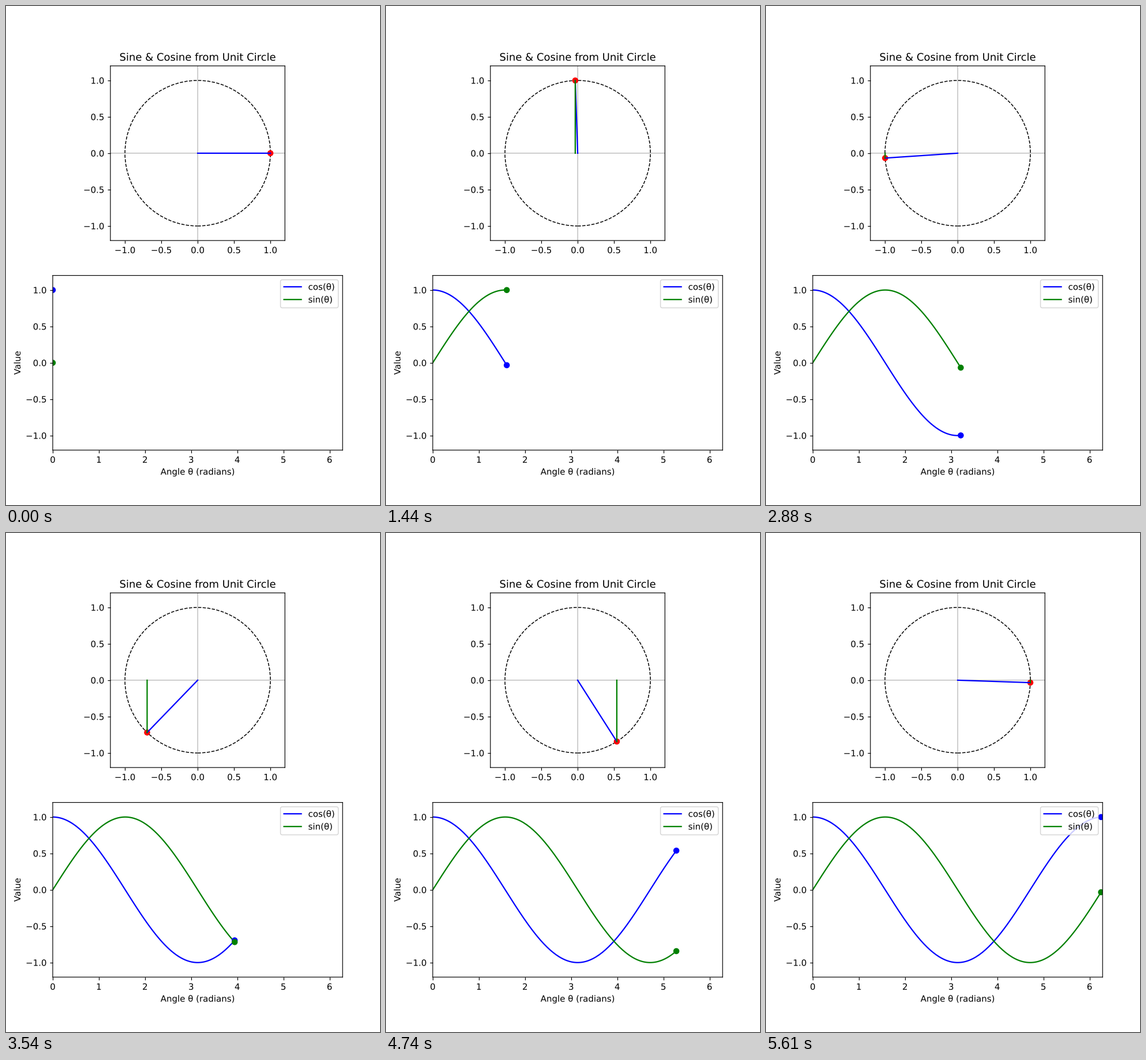
These frames come from a looping animation (648 by 864 pixels, 5.64 s). A matplotlib script:

```python
import numpy as np
import matplotlib.pyplot as plt
from matplotlib import patheffects
from matplotlib.animation import FuncAnimation

FRAMES = 188
STEP_MS = 30

theta = np.linspace(0, 2 * np.pi, FRAMES, endpoint=False)
cos, sin = np.cos(theta), np.sin(theta)

# Draw text, markers and straight lines at subpixel positions
plt.rcParams.update({
    "font.family": "DejaVu Sans",
    "text.hinting": "none",
    "path.snap": False,
    "path.effects": [patheffects.Normal()],
})
fig, (ax_circle, ax_wave) = plt.subplots(2, 1, figsize=(6, 8), dpi=108)

# Unit circle
ax_circle.set_title("Sine & Cosine from Unit Circle")
ax_circle.set_aspect("equal")
ax_circle.set(xlim=(-1.2, 1.2), ylim=(-1.2, 1.2))
ax_circle.axhline(0, color="gray", lw=0.5)
ax_circle.axvline(0, color="gray", lw=0.5)
ax_circle.add_patch(plt.Circle((0, 0), 1, fill=False, ls="--"))
point, = ax_circle.plot([], [], "ro")
radius, = ax_circle.plot([], [], "b-")
height, = ax_circle.plot([], [], "g-")

# Waves
ax_wave.set(xlim=(0, 2 * np.pi), ylim=(-1.2, 1.2),
            xlabel="Angle θ (radians)", ylabel="Value")
cos_line, = ax_wave.plot([], [], "b-", label="cos(θ)")
sin_line, = ax_wave.plot([], [], "g-", label="sin(θ)")
cos_dot, = ax_wave.plot([], [], "bo")
sin_dot, = ax_wave.plot([], [], "go")
ax_wave.legend(loc="upper right")


def update(i):
    t, x, y = theta[i], cos[i], sin[i]
    point.set_data([x], [y])
    radius.set_data([0, x], [0, y])
    height.set_data([x, x], [0, y])
    cos_line.set_data(theta[:i + 1], cos[:i + 1])
    sin_line.set_data(theta[:i + 1], sin[:i + 1])
    cos_dot.set_data([t], [x])
    sin_dot.set_data([t], [y])
    return point, radius, height, cos_line, sin_line, cos_dot, sin_dot


anim = FuncAnimation(fig, update, frames=FRAMES, interval=STEP_MS,
                     init_func=lambda: update(0), repeat=True, repeat_delay=0)
plt.show()
```
